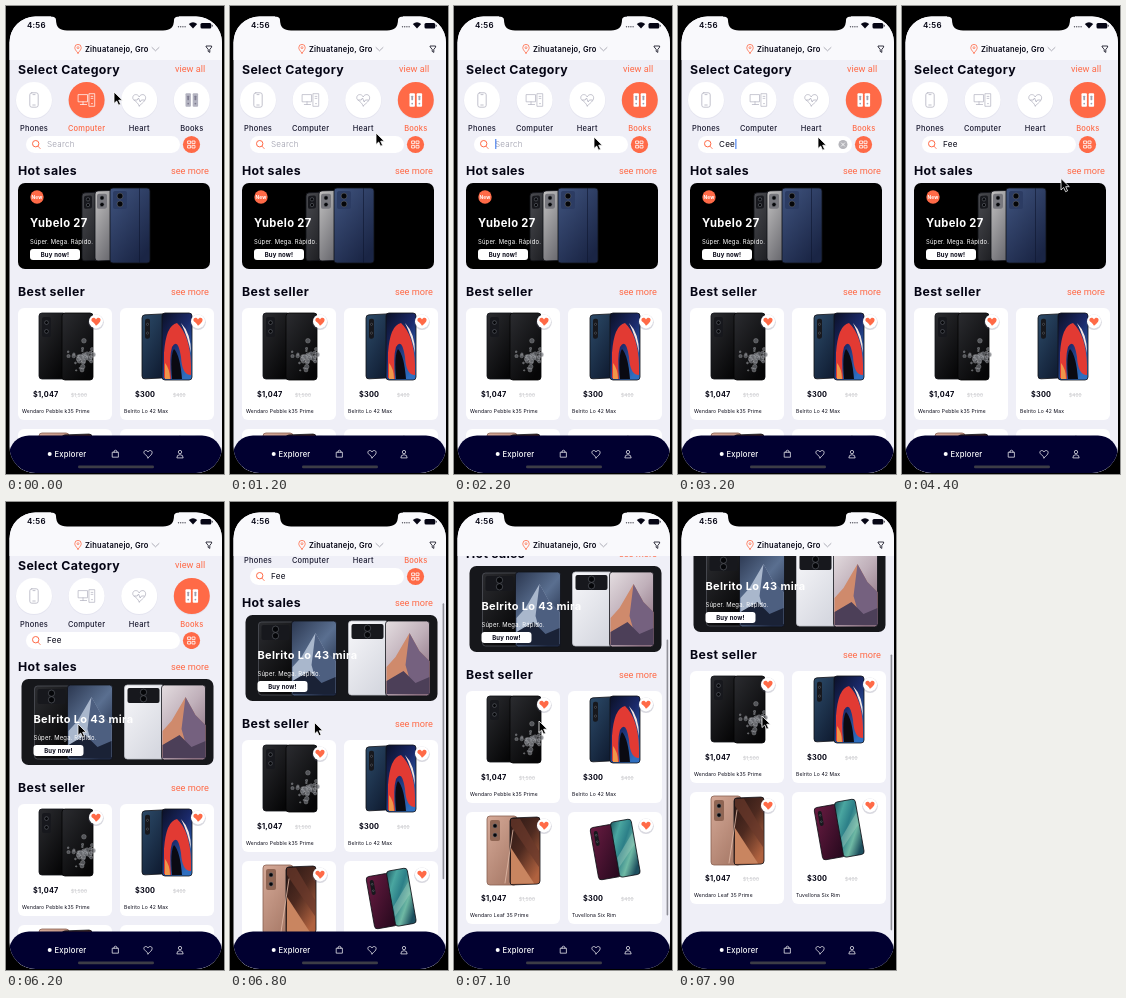
These frames come from a looping animation (218x468 px, 8000 ms). An HTML page:

```html
<!DOCTYPE html>
<html lang="es">
<head>
<meta charset="utf-8">
<title>Phone shop</title>
<style>
html, body { margin: 0; width: 100%; height: 100%; overflow: hidden; background: #000; }
svg { display: block; width: 100%; height: 100%; }
text { font-family: Inter, Roboto, sans-serif; letter-spacing: .03em; white-space: pre; }
.link { font-family: Roboto, Inter, sans-serif; letter-spacing: 0; }
.line { fill: none; stroke: currentColor; stroke-width: .8; stroke-linecap: round; stroke-linejoin: round; }
.cat { color: #b3b3c0; }
.cat .disc { fill: #fff; }
.cat .label { fill: #1a1a30; }
.cat.on { color: #fff; }
.cat.on .disc, .cat.on .label { fill: #ff6a47; }
</style>
</head>
<body>
<svg id="stage" viewBox="0 0 218 468" preserveAspectRatio="none"></svg>
<script>
const ORANGE = '#ff6a47', INK = '#050514', NAVY = '#010030';
const LOOP = 8000, STEP = 100;

// Drawing helpers
const text = (x, y, s, size, weight = 400, fill = INK, extra = '') =>
  `<text x="${x}" y="${y}" font-size="${size}" font-weight="${weight}" fill="${fill}" ${extra}>${s}</text>`;
const rect = (x, y, w, h, r, fill, extra = '') =>
  `<rect x="${x}" y="${y}" width="${w}" height="${h}" rx="${r}" fill="${fill}" ${extra}/>`;
const disc = (x, y, r, fill, extra = '') =>
  `<circle cx="${x}" cy="${y}" r="${r}" fill="${fill}" ${extra}/>`;
const shape = (d, fill, extra = '') => `<path d="${d}" fill="${fill}" ${extra}/>`;
const line = (d, color = 'inherit') => `<path class="line" style="color:${color}" d="${d}"/>`;
const move = (x, y, s, extra = '') => `<g transform="translate(${x} ${y})" ${extra}>${s}</g>`;
const scale = (k, s) => `<g transform="scale(${k})">${s}</g>`;
const heart = 'M0 4.2C-2-.1 -4.6.6 -4.6-1.6C-4.6-4.4 -1-4.6 0-2.2C1-4.6 4.6-4.4 4.6-1.6C4.6.6 2 2.4 0 4.2Z';

const shades = {
  graphite: ['#4a4b50', '#1d1e22'], silver: ['#c3c2c2', '#65656b'], blue: ['#40547f', '#1a2545'],
  black: ['#2b2c30', '#060607'], ocean: ['#2c4a68', '#101d33'], bronze: ['#d6aa98', '#a87a68'],
  wine: ['#6a1c42', '#2b0a20'], pearl: ['#f7f7fa', '#d6d8e0'], studio: ['#7f808a', '#45464d', '#202126'],
  swirl: ['#0b1026', '#1b2a6b', '#2f6fc0'], copper: ['#2a1714', '#4e2a20', '#b0623f'],
  teal: ['#1c5660', '#4aa6a0', '#2c7f88', '#6fb9a4', '#1d4f5e'],
  night: ['#2b3750', '#5a6f90', '#1d2740'], dawn: ['#e4dde0', '#c0b0ba', '#8a6f80'],
  candy: ['#f3e9d2', '#8fd0cf', '#f0d9b0']
};
const gradients = Object.entries(shades).map(([id, list]) =>
  `<linearGradient id="${id}" x1="0" y1="0" x2=".7" y2="1">${list.map((c, i) =>
    `<stop offset="${i / (list.length - 1)}" stop-color="${c}"/>`).join('')}</linearGradient>`).join('');

function slab(x, y, w, h, shade, tilt = 0, inner = '', edge = '#111218') {
  return `<g transform="translate(${x} ${y}) skewY(${tilt})">` +
    rect(0, 0, w, h, 3, `url(#${shade})`, `stroke="${edge}" stroke-width=".8"`) + inner + '</g>';
}
const lenses = (x, y, w, h, fill = '#17181d') => rect(x, y, w, h, 2, fill) +
  [.28, .72].map(k => disc(x + w / 2, y + h * k, Math.min(w, h) * .21, '#050609', 'stroke="#70747d" stroke-width=".5"')).join('');

// Loose cluster around the point (cx, cy)
function bubbles(cx, cy, spread, n) {
  let seed = 11, s = '';
  const rnd = () => (seed = seed * 16807 % 2147483647) / 2147483647;
  for (let i = 0; i < n; i++) {
    const a = rnd() * 6.283, d = spread * rnd();
    s += disc(cx + d * Math.cos(a) * .75, cy + d * Math.sin(a), .7 + rnd() * 2.2, '#6d6f74',
      'stroke="#d5d6d9" stroke-width=".4" opacity=".7"');
  }
  return s;
}
const hills = (peak, slope, base) => shape('M1 46L10 36L24 12L34 30L44 40V72H1Z', peak) +
  shape('M24 12L34 30L44 40V72H28L20 44Z', slope) + shape('M1 60L18 50L30 62L44 56V73H1Z', base);

// Carousel
function banner(i, fill, title, size, art, badge = '') {
  return move(12 + 206 * i, 177, rect(0, 0, 192, 86, 7, fill) + art + badge +
    text(12, 44, title, size, 700, '#fff') +
    text(12, 61, 'Súper. Mega. Rápido.', 5.9, 400, '#fff') +
    rect(12, 66, 50, 11, 3, '#fff') +
    text(37, 74, 'Buy now!', 6, 700, INK, 'text-anchor="middle"'));
}
const badge = disc(19, 14, 6.7, ORANGE) + text(19, 16, 'New', 4.8, 700, '#fff', 'text-anchor="middle"');
const banners =
  banner(0, '#000', 'Yubelo 27', 11.2,
    slab(64, 10, 20, 68, 'graphite', -3, lenses(2, 3, 8, 13)) +
    slab(77, 8, 24, 70, 'silver', -2, lenses(2, 3, 10, 15, '#77777d')) +
    slab(92, 5, 40, 75, 'blue', 0, lenses(3, 3, 14, 18, '#2c3c63') + rect(29, 0, .6, 75, 0, '#0e1730')), badge) +
  banner(1, 'url(#studio)', 'Quonda T58', 11.2,
    shape('M0 62H192V79Q192 86 185 86H7Q0 86 0 79Z', '#c9cad2') +
    slab(90, 2, 43, 80, 'pearl', 0,
      shape('M1 36L42 10V46L1 78Z', '#c6cbd8', 'opacity=".6"') + shape('M16 1L42 55V79H32Z', '#fff', 'opacity=".7"') +
      lenses(4, 4, 9, 18), '#a9adb9') +
    slab(133, 2, 44, 80, 'candy', 0,
      shape('M1 4Q24 2 26 26Q10 44 1 32Z', '#e0463f') + shape('M20 1H43V34Q28 32 20 1Z', '#2f9fa6') +
      shape('M4 42Q24 26 40 46Q30 74 8 66Z', '#f2b632') + shape('M18 52Q34 44 42 58V78H22Z', '#d9435a') +
      disc(17, 40, 6, '#fff') + disc(22, 4, 1.2, '#111'))) +
  banner(2, '#16171b', 'Belrito Lo 43 mira', 11,
    slab(13, 7, 36, 73, 'black', 0, lenses(3, 3, 28, 15), '#50525a') +
    slab(46, 6, 45, 75, 'night', 0, hills('#a9b7cc', '#4d5f80', '#1a2236')) +
    slab(103, 6, 40, 74, 'pearl', 0, lenses(3, 3, 32, 15), '#bfc2c9') +
    slab(140, 6, 44, 75, 'dawn', 0, hills('#cf8a6c', '#75617f', '#4c3f58')));

// Product cards
function card(x, y, name, price, old, art) {
  return move(x, y, rect(0, 0, 94, 112, 6, '#fff') + art +
    disc(78, 14.2, 7.8, '#6a6a85', 'opacity=".25"') + disc(78, 13.4, 7, '#fff') +
    move(78, 13.6, shape(heart, ORANGE)) +
    text(15, 89, price, 7.3, 700) +
    text(53, 88.5, old, 4.7, 500, '#cccccf', 'text-decoration="line-through"') +
    text(4, 105, name, 5));
}
const cards =
  card(12, 302, 'Wendaro Pebble k35 Prime', '$1,047', '$1,500',
    slab(21, 5, 27, 66, 'black', 0, lenses(3, 4, 9, 20)) +
    slab(44, 5, 31, 67, 'black', 0, bubbles(18, 44, 18, 30), '#030304')) +
  card(114, 302, 'Belrito Lo 42 Max', '$300', '$400',
    slab(22, 7, 24, 64, 'ocean', -3, lenses(3, 4, 5, 20)) +
    slab(42, 5, 30, 67, 'swirl', 0,
      shape('M2 65V40Q4 12 15 10Q28 22 29 52V62Q20 62 19 44Q16 24 10 34Q7 44 9 66Z', '#e23a33') +
      shape('M10 66Q8 42 12 36Q18 42 20 66Z', '#0a0a12') +
      shape('M19 10Q29 20 29 40Q26 24 19 10Z', '#f4e6e2') + shape('M3 50Q8 56 8 66H3Z', '#f0964a'))) +
  card(12, 423, 'Wendaro Leaf 35 Prime', '$1,047', '$1,500',
    slab(21, 4, 30, 69, 'bronze', 0, lenses(3, 4, 10, 21, '#8f6553'), '#8a6152') +
    slab(44, 6, 30, 67, 'copper', -2, shape('M1 30L24 66H1Z', '#c98560') + shape('M10 1L29 34V50L1 8V1Z', '#6b3a2c', 'opacity=".7"')) +
    line('M47 18L39 71', '#e2bba9')) +
  card(114, 423, 'Tuvellona Six Rim', '$300', '$400',
    '<g transform="rotate(-10 47 38)">' +
    slab(26, 12, 23, 53, 'wine', 0, lenses(3, 4, 4, 15)) +
    slab(47, 10, 21, 56, 'teal', 0, shape('M1 36L20 14V26L1 46Z', '#a9d3c0', 'opacity=".4"')) + '</g>');

// Categories
const icons = {
  Phones: '<rect class="line" x="-4.2" y="-7.2" width="8.4" height="14.4" rx="2"/>' + line('M-1.2 5H1.2M-1-5.4H1'),
  Computer: scale(.9, line('M-9-6H1V2H-9ZM-4 2V5M-7 5H0M3-7H9V7H3ZM5-4H7M5-1.8H7') + disc(6, 4, .8, 'currentColor')),
  Heart: scale(1.4, `<path class="line" style="stroke-width:.55" d="${heart}"/>`) + line('M-5 0H-2L-.7-2L1 2L2.2 0H5'),
  Books: scale(.9, [-7, 1].map(x => rect(x, -7.5, 6, 15, 1, 'currentColor') +
    rect(x + 2, -4.8, 2, 5, .5, '#55506a', 'opacity=".55"') + disc(x + 3, 4, 1, '#55506a', 'opacity=".55"')).join(''))
};
const cats = Object.keys(icons).map((name, i) => move(28 + 52.6 * i, 94,
  disc(0, .8, 18.3, '#d9d9e8', 'opacity=".5"') + '<circle class="disc" r="18"/>' + icons[name] +
  `<text class="label" y="30.5" font-size="7.5" font-weight="500" text-anchor="middle">${name}</text>`, 'class="cat"')).join('');

const heading = (y, title, link, x, linkY = y - 1) =>
  text(12, y, title, 12.3, 700) + text(x, linkY, link, 9.2, 400, ORANGE, 'class="link"');
const search =
  rect(20, 130, 154, 17, 8.5, '#fff') +
  line('M32 140.2L34.2 142.6', ORANGE) + disc(29.7, 137.7, 3.2, 'none', `stroke="${ORANGE}"`) +
  text(41, 141.2, 'Search', 8.1, 300, '#9c9cab', 'id="hint"') +
  text(41, 141.2, '', 8.1, 400, INK, 'id="query"') +
  rect(0, 133, 1, 10, 0, '#2f6fed', 'id="caret"') +
  `<g id="clear">${disc(165, 138.5, 4.5, '#b5b5ba')}${line('M163.4 136.9L166.6 140.1M166.6 136.9L163.4 140.1', '#fff')}</g>` +
  disc(185.5, 138.5, 8.6, ORANGE) +
  line('M182 135H184.6V137.6H182ZM186.4 135H189V137.6H186.4ZM182 139.4H184.6V142H182ZM186.4 139.4H189V142H186.4Z', '#fff');

const header =
  rect(3, 0, 213, 54, 0, '#f9f9fc') +
  text(21, 22.3, '4:56', 8, 600) +
  [0, 1, 2, 3].map(i => disc(172.5 + i * 2.2, 20.8, .7, '#55555f')).join('') +
  shape('M182.8 18Q187 14.6 191.2 18L187 22.6Z', INK) +
  rect(194.5, 17, 10.8, 5.4, 1.5, INK) + rect(205.8, 18.7, .8, 2, .4, INK) +
  line('M72 47.2C69.5 44 68.8 43.2 68.8 41.6A3.2 3.2 0 0 1 75.2 41.6C75.2 43.2 74.5 44 72 47.2Z', ORANGE) +
  disc(72, 41.7, 1, 'none', `stroke="${ORANGE}" stroke-width=".7"`) +
  text(79, 45.8, 'Zihuatanejo, Gro', 7.5, 600) +
  line('M146 41.5L149.5 44.8L153 41.5', '#9a9aa5') +
  line('M200.4 40H205.6V41.2L203.8 43.4V46.4L202.2 45.4V43.4L200.4 41.2Z', INK);

const nav =
  rect(3, 429.5, 213, 60, 20, NAVY) +
  disc(43.7, 448, 2, '#fff') + text(48.5, 450.8, 'Explorer', 7.6, 500, '#fff') +
  move(109.5, 448, scale(.88, line('M-3.3-2H3.3V3.6H-3.3ZM-1.7-2V-3.4Q0-5.2 1.7-3.4V-2', '#fff'))) +
  move(142, 448, scale(.9, line(heart, '#fff'))) +
  move(174, 448, scale(.88, line('M-3.6 4Q-3.6.8 0 .8T3.6 4Z', '#fff') + disc(0, -2.2, 1.9, 'none', 'stroke="#fff" stroke-width=".8"'))) +
  rect(72, 459.6, 76, 2.6, 1.3, '#3c3c46');

const stage = document.getElementById('stage');
stage.innerHTML = `<defs>${gradients}
  <clipPath id="screen"><rect x="3.5" y="10.5" width="212.5" height="456.5" rx="26"/></clipPath>
  <clipPath id="view"><rect x="3" y="54" width="213" height="413"/></clipPath>
  <clipPath id="window"><rect x="8" y="170" width="204" height="100"/></clipPath></defs>
  <rect width="218" height="468"/>
  <g clip-path="url(#screen)">${rect(3, 8, 213, 460, 0, '#efeff7')}
    <g clip-path="url(#view)"><g id="page">
      ${heading(68, 'Select Category', 'view all', 169, 65.5)}${cats}${search}
      ${heading(169, 'Hot sales', 'see more', 165)}
      <g clip-path="url(#window)"><g id="rail">${banners}</g></g>
      ${heading(289.5, 'Best seller', 'see more', 165)}${cards}</g></g>
    ${header}${nav}${rect(212.6, 0, 1.6, 276, .8, '#8f8f98', 'id="bar"')}</g>
  <path d="M45 0V10.5Q50 10.5 50 14Q50 24.5 61 24.5H157Q168 24.5 168 14Q168 10.5 173 10.5V0Z"/>
  <path id="pointer" d="M0 0V11.5L2.7 9L4.6 13.2L6.6 12.3L4.7 8.2H8.3Z" stroke="#fff" stroke-width=".8"/>`;

// Motion tables: time, then values
const pointerPath = [[0, 108, 86], [400, 134, 94], [500, 136, 95], [700, 180, 96], [900, 180, 98], [1200, 146, 127],
  [1800, 141, 132], [2100, 140, 131], [4200, 140, 131], [4600, 178, 214], [4800, 38, 216], [5000, 71, 214],
  [5200, 2, 214], [5300, 2, 214], [5400, 20, 216], [5800, 60, 222], [6200, 72, 222], [6500, 84, 222],
  [7100, 85, 219], [7900, 84, 214]];
const railPath = [[4600, 0], [4800, 140], [4900, 195], [5000, 206], [5200, 275], [5300, 350], [5400, 390], [5600, 408.5]];
const scrollPath = [[6500, 0], [6700, 42], [6900, 86], [7100, 113], [7300, 126], [7600, 133]];
const picks = [[0, 1], [400, 2], [800, 3]];
const typing = [[0, ''], [2600, 'C'], [2800, 'Ce'], [3000, 'Cee'], [3500, 'Ce'], [3600, 'C'], [3700, ''],
  [3800, 'F'], [3900, 'Fe'], [4000, 'Fee']];

const held = (rows, t) => rows.filter(r => r[0] <= t).pop()[1];
function tween(rows, t) {
  const next = rows.findIndex(r => r[0] > t);
  if (next === 0) return rows[0].slice(1);
  if (next < 0) return rows[rows.length - 1].slice(1);
  const a = rows[next - 1], b = rows[next], k = (t - a[0]) / (b[0] - a[0]);
  return a.slice(1).map((v, i) => v + (b[i + 1] - v) * k);
}

const el = id => document.getElementById(id);
const [page, rail, bar, pointer, query, hint, caret, clear] =
  ['page', 'rail', 'bar', 'pointer', 'query', 'hint', 'caret', 'clear'].map(el);
const catNodes = [...document.querySelectorAll('.cat')];
const shift = (node, x, y) => node.setAttribute('transform', `translate(${x} ${y})`);
const show = (node, on) => { node.style.display = on ? '' : 'none'; };

function draw(t) {
  const [scroll] = tween(scrollPath, t), word = held(typing, t), focus = t >= 2200 && t < 4200;
  shift(page, 0, -scroll);
  shift(rail, -tween(railPath, t)[0], 0);
  shift(bar, 0, 54 + scroll * .74);
  shift(pointer, ...tween(pointerPath, t));
  catNodes.forEach((node, i) => node.classList.toggle('on', i === held(picks, t)));
  query.textContent = word;
  show(hint, !word);
  show(caret, focus);
  show(clear, focus && word);
  show(bar, t >= 6500);
  caret.setAttribute('x', 41.3 + (word ? query.getComputedTextLength() : 0));
}

const start = performance.now();
function frame() {
  const t = (performance.now() - start) % LOOP;
  draw(Math.floor(t / STEP) * STEP);
  requestAnimationFrame(frame);
}
draw(0);
requestAnimationFrame(frame);
</script>
</body>
</html>
```
